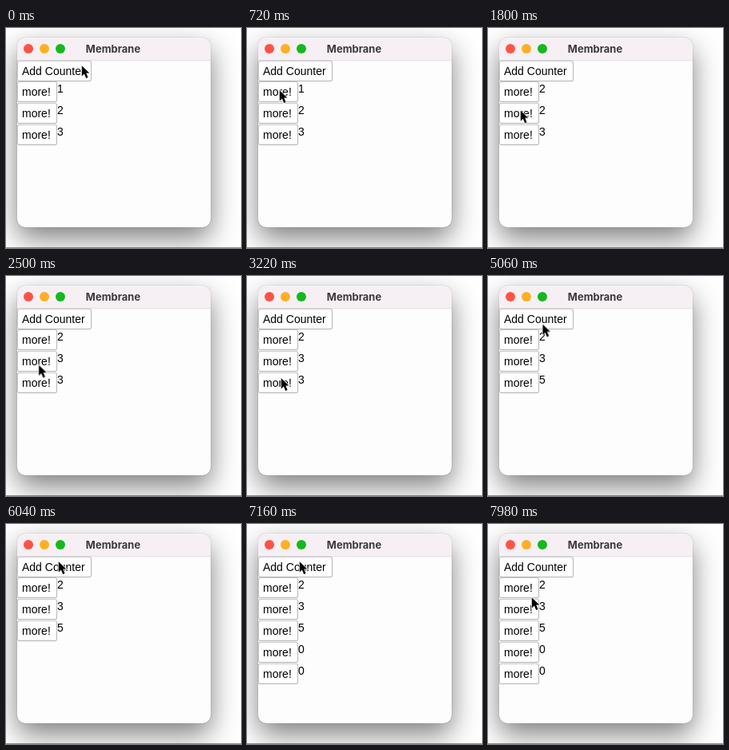
Animation, 294 px wide and 276 px high, one loop 8000 ms. Source, as an HTML page:

```html
<!DOCTYPE html>
<html lang="en">
<head>
<meta charset="utf-8">
<title>Counters</title>
<style>
html, body { margin: 0; width: 100%; height: 100%; overflow: hidden; background: #fff; }
#stage { position: relative; width: 294px; height: 276px; overflow: hidden;
  font: 14px/16px "Liberation Sans", Arial, sans-serif; color: #000; }
#stage * { position: absolute; box-sizing: border-box; white-space: nowrap; }
.desk { left: 0; top: 275px; width: 294px; height: 1px; background: #929292; }
.window { left: 14px; top: 12px; width: 242px; height: 238px; border-radius: 10px;
  background: #fdfdfd;
  box-shadow: 0 0 1px rgba(0,0,0,.5), 0 14px 34px rgba(0,0,0,.5); }
.bar { left: 0; top: 0; width: 242px; height: 29px; border-radius: 10px 10px 0 0;
  background: #f6f0f4; border-bottom: 1px solid #e3dde1; }
.bar i { top: 8px; width: 12px; height: 12px; border-radius: 50%; }
.bar b { left: 0; top: 6px; width: 240px; text-align: center;
  font: 700 13px/16px Inter, sans-serif; color: #3c393b; }
.button { left: 14px; width: 50px; height: 26px; padding: 4px 0 0 5px;
  border: 1px solid #c9c9c9; border-right-color: #bababa; border-bottom-color: #b4b4b4;
  border-radius: 3px; background: #fff; box-shadow: 0 0 1px rgba(0,0,0,.2); }
.add { top: 41px; width: 93px; }
.row { left: 0; top: calc(67px + 27px * var(--n)); width: 100px; height: 27px; }
.value { left: 64px; top: 1px; width: 10px; height: 16px; overflow: hidden; }
.value span { left: 0; top: 0; white-space: pre !important; }
.pointer { left: 0; top: 0; width: 12px; height: 19px; overflow: visible;
  animation: move 8s ease-in-out infinite; }

.one { animation: one 8s step-end infinite; }
.two { animation: two 8s step-end infinite; }
.three { animation: three 8s step-end infinite; }
.four { animation: four 8s step-end infinite; }
.five { animation: five 8s step-end infinite; }
@keyframes one { 0% { transform: none } 14%, 100% { transform: translateY(-16px) } }
@keyframes two { 0% { transform: none } 26.25%, 100% { transform: translateY(-16px) } }
@keyframes three {
  0% { transform: none }
  41.75% { transform: translateY(-16px) }
  47.25%, 100% { transform: translateY(-32px) }
}
@keyframes four { 0% { visibility: hidden } 76.75%, 100% { visibility: visible } }
@keyframes five { 0% { visibility: hidden } 87.75%, 100% { visibility: visible } }
@keyframes move {
  0%, .25% { transform: translate(94px, 46px) }
  9%, 20.75% { transform: translate(40px, 77px) }
  22.5% { transform: translate(40px, 102px); animation-timing-function: ease-out }
  23%, 30% { transform: translate(40px, 108px) }
  35%, 57.5% { transform: translate(42px, 127px) }
  64.75%, 68% { transform: translate(70px, 53px) }
  71.75%, 96.25% { transform: translate(65px, 46px) }
  99.75%, 100% { transform: translate(54px, 91px) }
}
</style>
</head>
<body>
<div id="stage">
  <div class="desk"></div>
  <div class="window">
    <div class="bar">
      <i style="left:8px;background:#fe5248"></i>
      <i style="left:28px;background:#fdb024"></i>
      <i style="left:48px;background:#14b91e"></i>
      <b>Membrane</b>
    </div>
  </div>
  <div class="button add">Add Counter</div>
  <div class="row" style="--n:0"><div class="button">more!</div><div class="value"><span class="one">1
2</span></div></div>
  <div class="row" style="--n:1"><div class="button">more!</div><div class="value"><span class="two">2
3</span></div></div>
  <div class="row" style="--n:2"><div class="button">more!</div><div class="value"><span class="three">3
4
5</span></div></div>
  <div class="row four" style="--n:3"><div class="button">more!</div><div class="value"><span>0</span></div></div>
  <div class="row five" style="--n:4"><div class="button">more!</div><div class="value"><span>0</span></div></div>
  <svg class="pointer" viewBox="0 0 12 19">
    <path d="M.8 1.2V14.4L3.9 11.5 6.2 17 8.6 16 6.3 10.6H10.4Z" fill="#000" stroke="#fff" stroke-width="1.4" paint-order="stroke"/>
  </svg>
</div>
</body>
</html>
```
